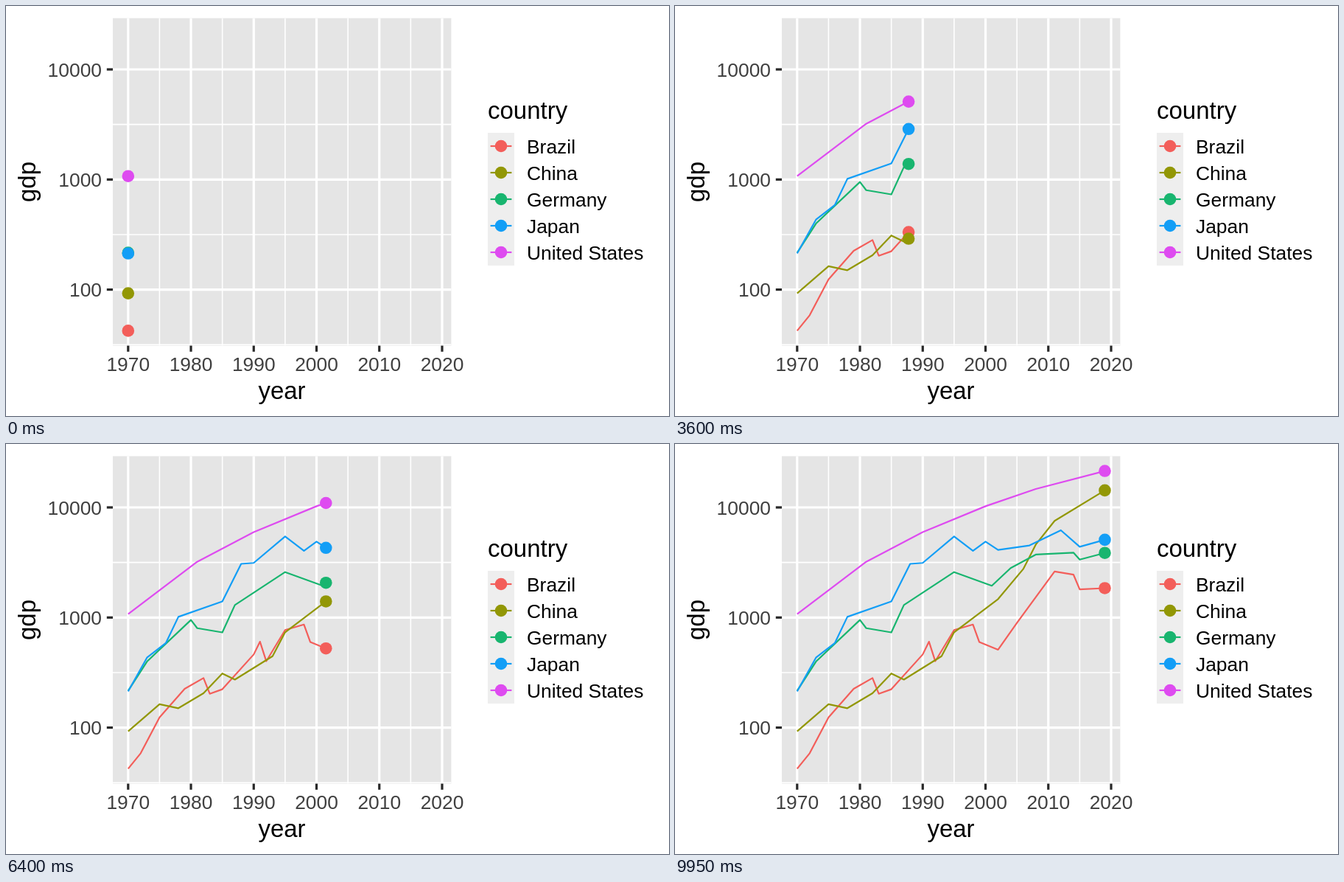
An HTML page with a canvas that plays this animation: 900 by 556 pixels, repeating every 10 s.

```html
<!DOCTYPE html>
<html lang="en">
<head>
<meta charset="utf-8">
<title>GDP by country</title>
<style>
  html, body { margin: 0; width: 100%; height: 100%; overflow: hidden; background: #fff; }
  canvas { display: block; }
</style>
</head>
<body>
<canvas id="chart" width="900" height="556"></canvas>
<script>
const ctx = document.getElementById('chart').getContext('2d');
const LOOP = 10000, STEP = 50, LAST_FRAME = 199, LAST_YEAR = 49;
const panel = { left: 145, top: 16.5, right: 604.4, bottom: 460.6 };

// Turning points only: [years since 1970, GDP in billions], steady growth in between.
const series = [
  { name: 'Brazil', color: '#f35e5a', points: [
    [0, 42.3], [2, 58.5], [5, 124], [9, 225], [12, 282], [13, 203], [15, 223],
    [20, 462], [21, 603], [22, 401], [25, 770], [28, 864], [29, 600], [32, 510],
    [35, 892], [41, 2616], [44, 2456], [45, 1802], [49, 1848]] },
  { name: 'China', color: '#929705', points: [
    [0, 92.6], [5, 163], [8, 150], [12, 205], [15, 310], [17, 273], [23, 445],
    [25, 735], [32, 1471], [36, 2752], [38, 4594], [41, 7552], [49, 14280]] },
  { name: 'Germany', color: '#18b56f', points: [
    [0, 216], [3, 398], [10, 950], [11, 800], [15, 732], [17, 1298], [25, 2586],
    [31, 1944], [34, 2815], [38, 3730], [44, 3884], [45, 3356], [49, 3861]] },
  { name: 'Japan', color: '#139ef6', points: [
    [0, 213], [3, 432], [6, 586], [8, 1014], [15, 1399], [18, 3072], [20, 3133],
    [25, 5449], [28, 4033], [30, 4888], [32, 4115], [37, 4515], [42, 6203],
    [45, 4389], [49, 5082]] },
  { name: 'United States', color: '#de4bf0', points: [
    [0, 1073], [11, 3207], [20, 5963], [30, 10252], [38, 14713], [49, 21433]] }
];

const xAt = year => 165.8 + year * 8.524;
const yAt = gdp => 235.3 - 149.3 * Math.log10(gdp / 1000);

function line(x1, y1, x2, y2, color, width) {
  ctx.strokeStyle = color;
  ctx.lineWidth = width;
  ctx.beginPath();
  ctx.moveTo(x1, y1);
  ctx.lineTo(x2, y2);
  ctx.stroke();
}

function dot(x, y, color) {
  ctx.fillStyle = color;
  ctx.beginPath();
  ctx.arc(x, y, 8.3, 0, Math.PI * 2);
  ctx.fill();
}

function text(str, x, y, size, color, align) {
  ctx.font = `${size}px "Liberation Sans", Arial, sans-serif`;
  ctx.fillStyle = color;
  ctx.textAlign = align;
  ctx.fillText(str, x, y);
}

function drawAxes() {
  const { left, top, right, bottom } = panel;
  ctx.fillStyle = '#e5e5e5';
  ctx.fillRect(left, top, right - left, bottom - top);

  for (let power = 1.5; power < 4; power++) {
    const y = yAt(10 ** power);
    line(left, y, right, y, '#fff', 1.6);
  }
  for (let year = 5; year < 50; year += 10) line(xAt(year), top, xAt(year), bottom, '#fff', 1.6);

  for (let gdp = 100; gdp <= 10000; gdp *= 10) {
    const y = yAt(gdp);
    line(left, y, right, y, '#fff', 3.2);
    line(left - 8.2, y, left, y, '#282828', 3.2);
    text(gdp, 130, y + 9.6, 26.4, '#404040', 'right');
  }
  for (let year = 0; year <= 50; year += 10) {
    const x = xAt(year);
    line(x, top, x, bottom, '#fff', 3.2);
    line(x, bottom, x, bottom + 8.2, '#282828', 3.2);
    text(1970 + year, x, 495, 26.4, '#404040', 'center');
  }

  text('year', 374.5, 533, 33, '#000', 'center');
  ctx.save();
  ctx.translate(40, 238.5);
  ctx.rotate(-Math.PI / 2);
  text('gdp', 0, 0, 33, '#000', 'center');
  ctx.restore();
}

function drawLegend() {
  text('country', 654, 153, 33, '#000', 'left');
  ctx.fillStyle = '#eee';
  ctx.fillRect(654, 172, 36, 180);
  series.forEach(({ name, color }, i) => {
    const y = 190 + i * 36;
    line(657.6, y, 686.4, y, color, 2.2);
    dot(672, y, color);
    text(name, 707, y + 9.8, 26.4, '#000', 'left');
  });
}

// Every year lands on a whole frame; the time between is shared evenly.
const frameOf = year => Math.round(year * LAST_FRAME / LAST_YEAR);

function yearAt(frame) {
  let year = 0;
  while (year < LAST_YEAR - 1 && frameOf(year + 1) <= frame) year++;
  const start = frameOf(year);
  return year + (frame - start) / (frameOf(year + 1) - start);
}

function heightAt(points, year) {
  const next = Math.max(1, points.findIndex(p => p[0] >= year));
  const [startYear, startGdp] = points[next - 1];
  const [endYear, endGdp] = points[next];
  const share = (year - startYear) / (endYear - startYear);
  return yAt(startGdp * (endGdp / startGdp) ** share);
}

function drawSeries(now) {
  ctx.lineWidth = 2.2;
  for (const { color, points } of series) {
    ctx.strokeStyle = color;
    ctx.beginPath();
    for (const [year, gdp] of points) if (year < now) ctx.lineTo(xAt(year), yAt(gdp));
    ctx.lineTo(xAt(now), heightAt(points, now));
    ctx.stroke();
  }
  for (const { color, points } of series) dot(xAt(now), heightAt(points, now), color);
}

function draw(time) {
  ctx.clearRect(0, 0, 900, 556);
  drawAxes();
  drawLegend();
  drawSeries(yearAt(Math.floor(time % LOOP / STEP)));
  requestAnimationFrame(draw);
}

ctx.lineJoin = 'round';
requestAnimationFrame(draw);
</script>
</body>
</html>
```
